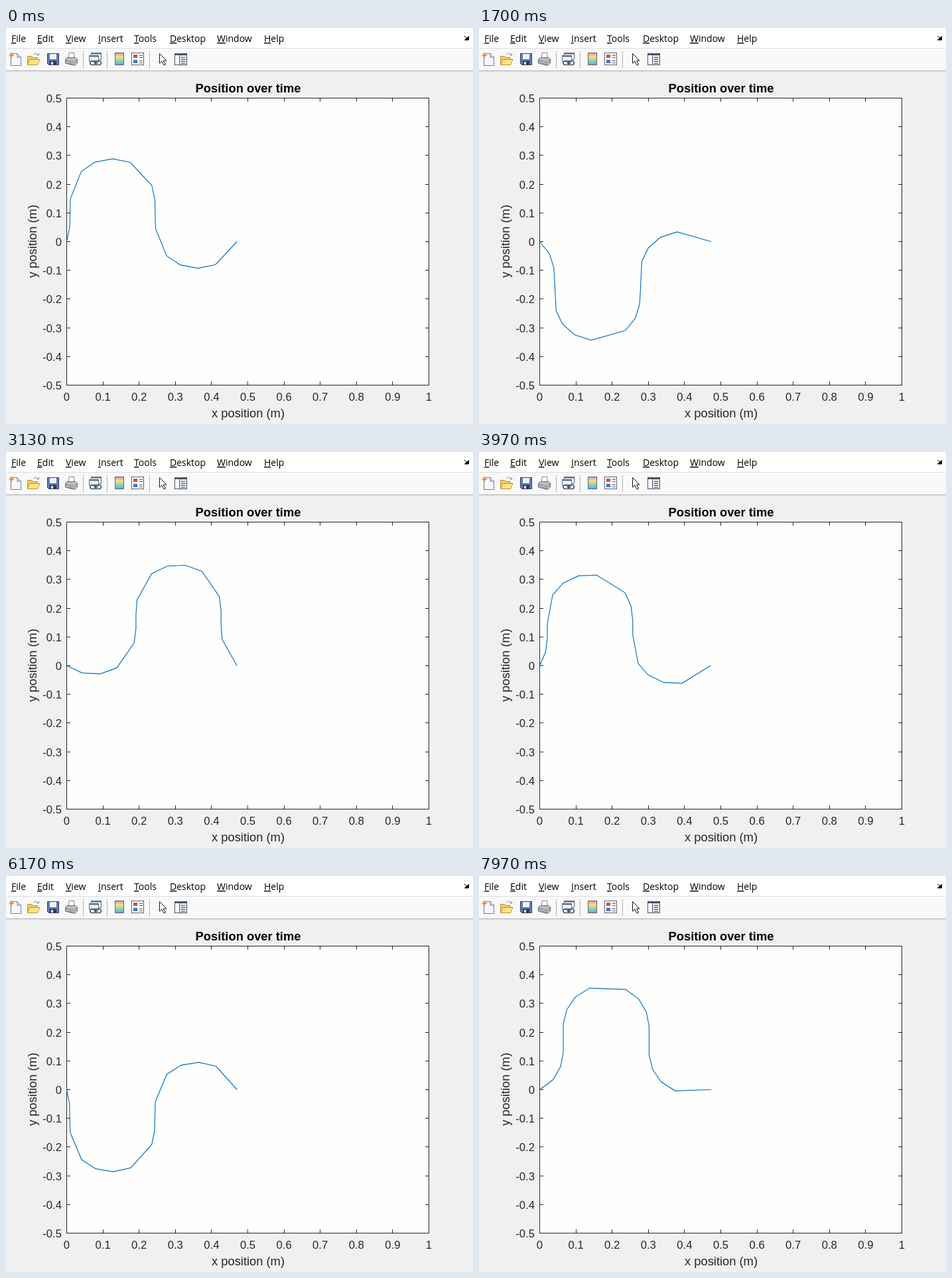
Animation, 704 px wide and 596 px high, one loop 8000 ms. Source, as an HTML page:

```html
<!DOCTYPE html>
<html lang="en">
<head>
<meta charset="utf-8">
<title>Position over time</title>
<style>
  html, body { margin: 0; width: 100%; height: 100%; overflow: hidden; background: #f0f0f0; }
  svg { display: block; width: 100vw; height: 100vh; }
  .menu { font: 14px "Open Sans", "Noto Sans", sans-serif; fill: #000; }
  .menu .key { text-decoration: underline; }
  .tick { font: 16.67px "Liberation Sans", Arial, sans-serif; fill: #262626; }
  .label { font: 18.33px "Liberation Sans", Arial, sans-serif; fill: #262626; text-anchor: middle; }
  .title { font-weight: bold; fill: #000; }
  .axes { stroke: #262626; shape-rendering: crispEdges; }
</style>
</head>
<body>
<svg viewBox="0 0 704 596">
  <defs>
    <linearGradient id="spectrum" x2="0" y2="1">
      <stop offset="0" stop-color="#e89a94"/>
      <stop offset=".35" stop-color="#f0e08a"/>
      <stop offset=".65" stop-color="#8fd8b0"/>
      <stop offset="1" stop-color="#6c9be0"/>
    </linearGradient>
  </defs>

  <rect width="704" height="596" fill="#f0f0f0"/>
  <rect width="704" height="64" fill="#f9f9f9"/>
  <rect width="704" height="30" fill="#fff"/>
  <path d="M0 30.5H704" stroke="#dcdcdc"/>
  <path d="M0 64.5H704" stroke="#a8a8a8"/>
  <g id="menu" class="menu"></g>
  <path d="M691 12L695 15.500M697.500 12.500V18H691.500Z" fill="#000" stroke="#000"/>

  <g id="toolbar">
    <path d="M116.500 35V61M152.500 35V61M216.500 35V61" stroke="#b4b4b4"/>
    <!-- new -->
    <path d="M7.500 38.500H17L22.500 44V56.500H7.500Z" fill="#f6f9ff" stroke="#6f7f9b"/>
    <path d="M17 38.500V44H22.500" fill="#cfdcf0" stroke="#6f7f9b"/>
    <path d="M8 36L9.500 39.500L13 41L9.500 42.500L8 46L6.500 42.500L4 41L6.500 39.500Z" fill="#ee8a35"/>
    <!-- open -->
    <path d="M32.500 55.500V42.500H39L41 44.500H47.500V47" fill="#f0cf60" stroke="#b8913a"/>
    <path d="M32.500 55.500L36 47.500H51L47.500 55.500Z" fill="#ffe588" stroke="#b8913a"/>
    <path d="M41 40Q46 36 49 41M46.500 41H49.500V38" fill="none" stroke="#6f8fb5"/>
    <!-- save -->
    <path d="M62.500 38.500H79.500V55.500H64.500L62.500 53.500Z" fill="#6078b4" stroke="#34406c"/>
    <rect x="66" y="39" width="10" height="8" fill="#eef2fa"/>
    <rect x="66" y="49.500" width="10" height="6" fill="#34384c"/>
    <rect x="68" y="51" width="3" height="4" fill="#e0e4ee"/>
    <!-- print -->
    <path d="M94 46L95 37.500H103L103 46" fill="#fff" stroke="#85888c"/>
    <path d="M89.500 47L93 44.500H104L107.500 47V53L103 56.500L89.500 53Z" fill="#b9bcc0" stroke="#6c6f74"/>
    <path d="M90 49L103 52L107 48M93 53L102 55" fill="none" stroke="#777b80"/>
    <rect x="101" y="53" width="3" height="2" fill="#e0b040"/>
    <!-- link -->
    <rect x="128.500" y="37.500" width="15" height="10" fill="#f0f4fa" stroke="#627188"/>
    <rect x="125.500" y="41.500" width="14" height="9" fill="#f0f4fa" stroke="#627188"/>
    <path d="M128 38.500H144M125 42.500H140" stroke="#627188" stroke-width="2"/>
    <g fill="none" stroke="#46566e" stroke-width="1.6">
      <rect x="127" y="49.500" width="9" height="6" rx="3"/>
      <rect x="134.500" y="49.500" width="9" height="6" rx="3"/>
      <path d="M132 52.500H139"/>
    </g>
    <!-- colorbar -->
    <rect x="164.500" y="37.500" width="13" height="18" fill="url(#spectrum)" stroke="#56637a"/>
    <!-- legend -->
    <rect x="189.500" y="37.500" width="18" height="18" fill="#fff" stroke="#56637a"/>
    <rect x="192" y="40" width="6" height="5" fill="#d0524a"/>
    <rect x="192" y="48" width="6" height="5" fill="#4a70c4"/>
    <path d="M201 41.500H206M201 44.500H206M201 49.500H206M201 52.500H206" stroke="#555"/>
    <!-- pointer -->
    <path d="M231.500 38.500V53L235 50L238 56L240.500 55L237.500 49H242Z" fill="#fff" stroke="#111"/>
    <!-- inspector -->
    <rect x="254.500" y="38.500" width="18" height="17" fill="#fff" stroke="#4c5360"/>
    <path d="M254 39.500H273" stroke="#4c5360" stroke-width="3"/>
    <rect x="262" y="41" width="10" height="14" fill="#dce3ec"/>
    <path d="M261.500 41V55" stroke="#4c5360"/>
    <path d="M264 44.500H270M264 47.500H270M264 50.500H270M264 53.500H270" stroke="#555"/>
  </g>

  <rect class="axes" x="91.5" y="105.5" width="546" height="432" fill="#fefefd"/>
  <path id="ticks" class="axes" fill="none"/>
  <g id="tickLabels" class="tick"></g>
  <text class="label title" x="365" y="97">Position over time</text>
  <text class="label" x="365" y="586">x position (m)</text>
  <text class="label" transform="translate(46 321) rotate(-90)">y position (m)</text>
  <polyline id="curve" fill="none" stroke="#0072bd" stroke-width="1.15"/>
</svg>
<script>
const byId = id => document.getElementById(id);
const plot = { left: 91.5, top: 105.5, width: 546, height: 432 };
const toX = x => plot.left + x * plot.width;
const toY = y => plot.top + (0.5 - y) * plot.height;

const menuItems = { File: 8, Edit: 47, View: 90, Insert: 139, Tools: 193, Desktop: 247, Window: 318, Help: 389 };
byId("menu").innerHTML = Object.entries(menuItems).map(([name, x]) =>
  `<text x="${x}" y="21"><tspan class="key">${name[0]}</tspan>${name.slice(1)}</text>`).join("");

let tickPath = "", labels = "";
for (let i = 0; i <= 10; i++) {
  const x = toX(i / 10), y = toY(i / 10 - 0.5);
  const right = plot.left + plot.width, bottom = plot.top + plot.height;
  tickPath += `M${x} ${plot.top}v5.5M${x} ${bottom}v-5.5M${plot.left} ${y}h5.5M${right} ${y}h-5.5`;
  labels += `<text x="${x}" y="561" text-anchor="middle">${i / 10}</text>
    <text x="84" y="${y + 6.5}" text-anchor="end">${(i - 5) / 10}</text>`;
}
byId("ticks").setAttribute("d", tickPath);
byId("tickLabels").innerHTML = labels;

// A chain of 16 links; each link's heading follows a sine of its midpoint's arc length.
const LOOP = 8000, STEP_MS = 139.5, STEP_LEAD = 114, STEP_DEG = 12.02, START_DEG = 54.4;
const linkLengths = Array.from({ length: 16 }, (_, i) => i % 4 === 3 ? 0.1 : 0.05);

function chainPoints(phaseDeg) {
  let x = 0, y = 0, arc = 0;
  const points = [[toX(0), toY(0)]];
  for (const length of linkLengths) {
    const phase = 2 * Math.PI * (arc + length / 2) + phaseDeg * Math.PI / 180;
    const heading = Math.PI / 2 * Math.sin(phase);
    x += length * Math.cos(heading);
    y += length * Math.sin(heading);
    arc += length;
    points.push([toX(x), toY(y)]);
  }
  return points.map(p => p.map(v => v.toFixed(2)).join()).join(" ");
}

function draw() {
  const time = performance.now() % LOOP;
  const step = Math.floor((time + STEP_LEAD) / STEP_MS);
  byId("curve").setAttribute("points", chainPoints(START_DEG + step * STEP_DEG));
  requestAnimationFrame(draw);
}
draw();
</script>
</body>
</html>
```
